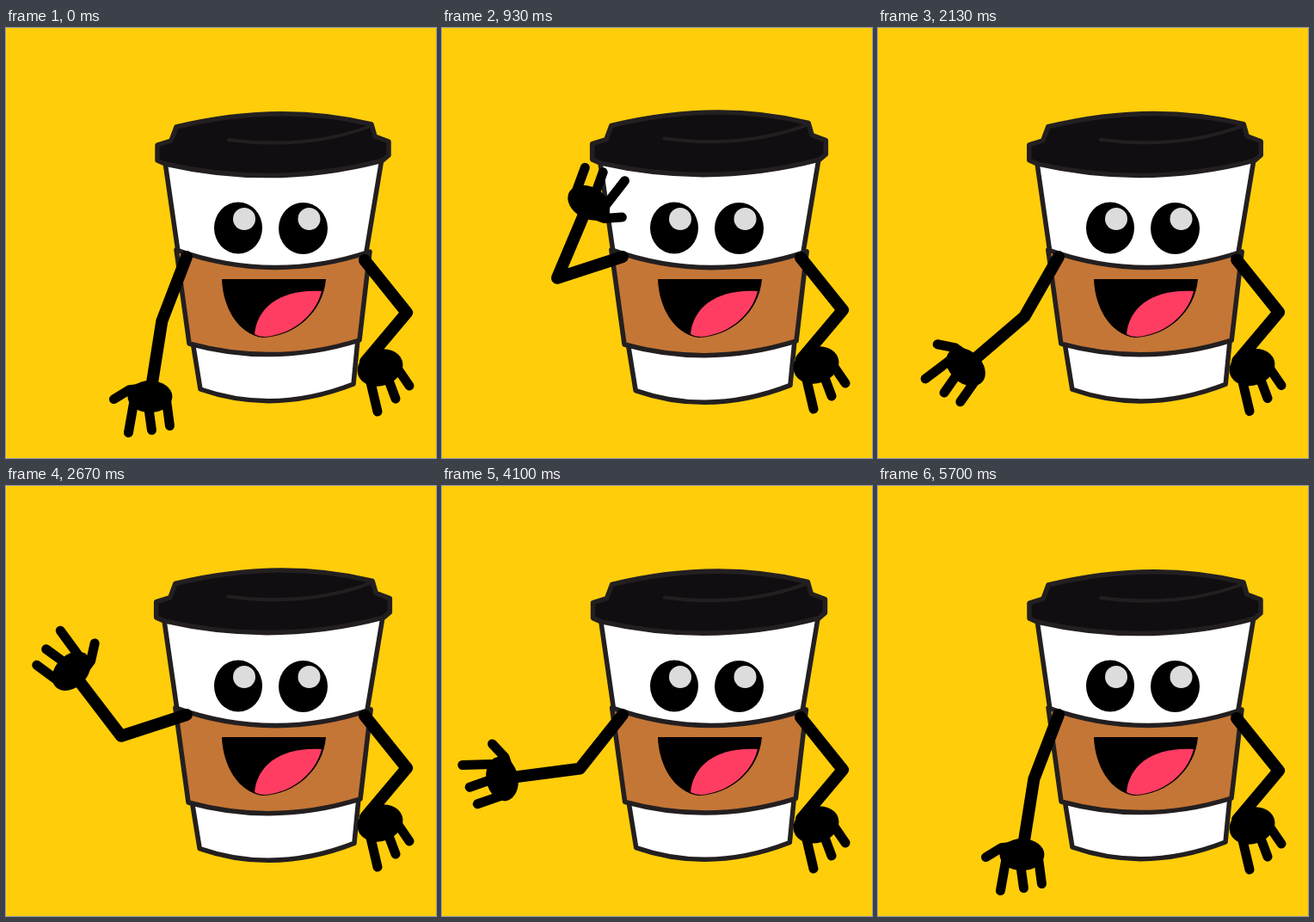
An HTML page for the animation above (5.73 s loop, 500 px wide and 500 px high).

```html
<!DOCTYPE html>
<html lang="en">
<head>
<meta charset="utf-8">
<title>Waving coffee cup</title>
<style>
  html, body { margin: 0; height: 100%; overflow: hidden; background: #ffcd0a; }
  svg { display: block; width: 100vw; height: 100vh; }
  .line { stroke: #231f20; stroke-width: 5.5; stroke-linejoin: round; }
  .limb, .finger { fill: none; stroke: #000; stroke-linecap: round; stroke-linejoin: round; }
  .limb { stroke-width: 14; }
  .finger { stroke-width: 11; }
</style>
</head>
<body>
<svg viewBox="0 0 500 500">
  <g id="cup">
    <g class="line">
      <path fill="#fff" d="M185 156L200 260L226 420Q312 450 404 414L419 260L437 152Z"/>
      <path fill="#c47636" d="M198 258Q310 298 423 260L411 363Q312 394 213 367Z"/>
      <path fill="#100e11" d="M176 136L192 131L198 115Q318 86 425 112L429 126L445 132V148L438 154Q312 187 185 158L176 154Z"/>
    </g>
    <path fill="none" stroke="#231f20" stroke-width="4" stroke-linecap="round" d="M259 130Q350 142 424 114"/>
  </g>
  <g>
    <ellipse cx="270" cy="232.500" rx="28" ry="30"/>
    <ellipse cx="345.500" cy="233" rx="28.500" ry="30"/>
    <g fill="#dcdcdc">
      <circle cx="277" cy="222" r="13"/>
      <circle cx="352.500" cy="222" r="13"/>
    </g>
    <path d="M251 292H372C369 330 336 359 298 360C270 356 252 325 251 292Z"/>
    <path fill="#ff3d63" d="M289 356C292 323 322 303 367 306C360 335 331 357 301 359Q294 359 289 356Z"/>
  </g>
  <g id="rest">
    <path class="limb" d="M417 270L466 331L418 388"/>
    <ellipse cx="435" cy="395" rx="27" ry="21" transform="rotate(-18 435 395)"/>
    <path class="finger" d="M424 412L432 446M444 407L453 431M456 397L469 416"/>
  </g>
  <path id="arm" class="limb"/>
  <g id="hand">
    <ellipse rx="26" ry="18.500"/>
    <path class="finger" d="M-42 3L-24 -8L-8 -10M-19 8L-25 42M-2 10L2 39M19 4L23 34"/>
  </g>
</svg>
<script>
const LOOP = 1910, UP = 560, DOWN = 1290;   // the arm waves between UP and DOWN
const $ = id => document.getElementById(id);
const clamp = (x, lo, hi) => Math.min(hi, Math.max(lo, x));

function ease(t, from, to) {
  const p = clamp((t - from) / (to - from), 0, 1);
  return p * p * (3 - 2 * p);
}

function reach([x, y], length, degrees) {
  const r = degrees * Math.PI / 180;
  return [x + length * Math.cos(r), y + length * Math.sin(r)];
}

function draw(t) {
  const lift = ease(t, 100, UP) - ease(t, DOWN, 1675);
  const swing = ease(t, 80, UP) - ease(t, DOWN, 1635);
  // Two outward swings of the forearm, 0 to 1
  const turns = 2 * (clamp(t, UP, DOWN) - UP) / (DOWN - UP);
  const wave = (1 - Math.cos(2 * Math.PI * turns)) / 2;

  const start = [210, 266];
  const fore = 99 + 194 * swing - 62 * wave;
  const elbow = reach(start, 80, 111 + 51 * lift);
  const palm = reach(elbow, 89 + 6 * lift, fore);
  const twist = 14 * (lift - wave);
  $("arm").setAttribute("d", `M${start}L${elbow}L${palm}`);
  $("hand").setAttribute("transform", `translate(${palm}) rotate(${fore - 99 + twist})`);

  // The cup swells and the resting arm rises a little while waving
  $("cup").setAttribute("transform", `translate(310 268) scale(${1 + 0.01 * lift}) translate(-310 -268)`);
  $("rest").setAttribute("transform", `translate(0 ${-3 * lift})`);
}

const begin = performance.now();
function tick() {
  draw((performance.now() - begin) % LOOP);
  requestAnimationFrame(tick);
}
tick();
</script>
</body>
</html>
```
